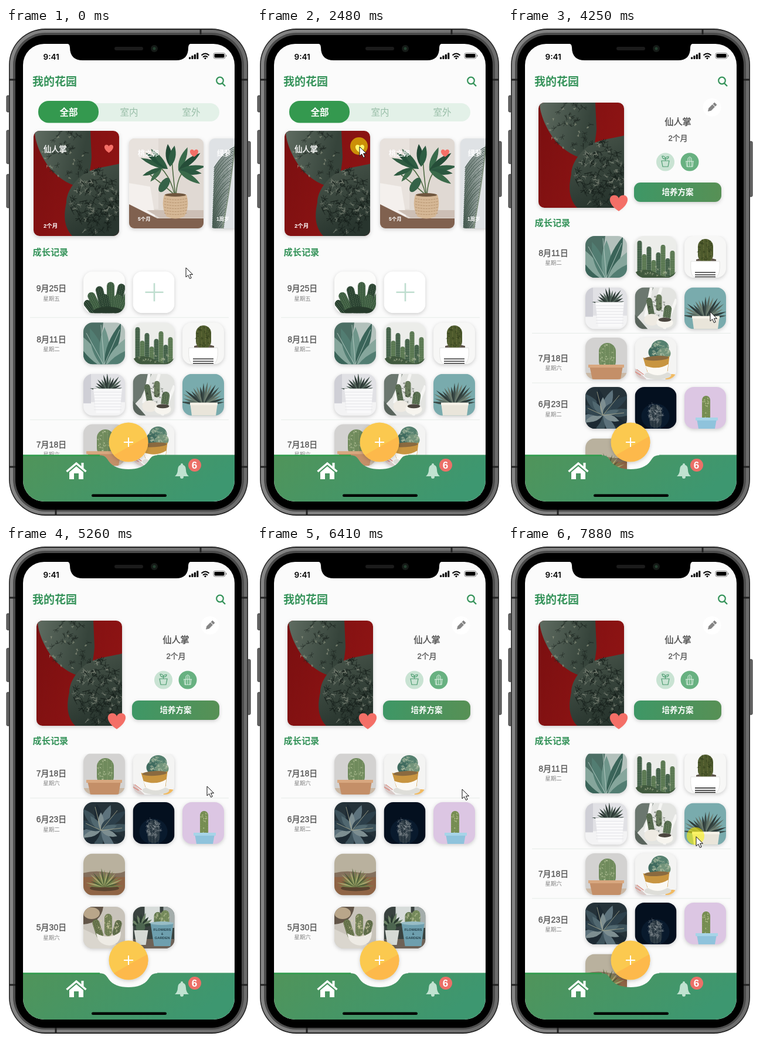
An HTML page for the animation above (8000 ms loop, 418 px wide and 834 px high).

```html
<!DOCTYPE html>
<html lang="zh-CN">
<head>
<meta charset="utf-8">
<title>我的花园</title>
<style>
html, body { margin: 0; width: 100%; height: 100%; overflow: hidden; background: #fff; }
svg { display: block; width: 100%; height: 100%; }
text { font-family: "Liberation Sans", "Noto Sans CJK SC", "Noto Sans CJK", sans-serif; }
.lift { filter: drop-shadow(0 2px 3px rgba(0, 0, 0, .18)); }
</style>
</head>
<body>
<svg id="stage" viewBox="0 0 418 834"></svg>
<script>
// --- drawing helpers, all returning SVG markup ---
let seed = 7;
const random = () => (seed = seed * 16807 % 2147483647) / 2147483647;
const repeat = (n, fn) => Array.from({ length: n }, (_, i) => fn(i)).join('');
const rect = (x, y, w, h, r, fill, more = '') =>
  `<rect x="${x}" y="${y}" width="${w}" height="${h}" rx="${r}" fill="${fill}" ${more}/>`;
const disc = (x, y, r, fill, more = '') => `<circle cx="${x}" cy="${y}" r="${r}" fill="${fill}" ${more}/>`;
const oval = (x, y, rx, ry, fill, turn = 0) =>
  `<ellipse rx="${rx}" ry="${ry}" fill="${fill}" transform="translate(${x} ${y}) rotate(${turn})"/>`;
const shape = (d, fill, more = '') => `<path d="${d}" fill="${fill}" ${more}/>`;
const line = (d, color, width = 1, more = '') => shape(d, 'none', `stroke="${color}" stroke-width="${width}" ${more}`);
// Weight 500 is a regular face thickened by a hairline stroke
const label = (text, x, midY, size, fill, weight = 500, anchor = 'middle') =>
  `<text x="${x}" y="${midY + size * .37}" font-size="${size}" fill="${fill}" text-anchor="${anchor}" ` +
  (weight === 500 ? `stroke="${fill}" stroke-width=".35"` : `font-weight="${weight}"`) + `>${text}</text>`;
const gradient = (id, from, to, vector = 'x2="1" y2="0"') =>
  `<linearGradient id="${id}" ${vector}><stop stop-color="${from}"/><stop offset="1" stop-color="${to}"/></linearGradient>`;
const clip = (id, body) => `<clipPath id="${id}">${body}</clipPath>`;
const HEART = 'M0 .43C-.64 .02-.53-.42-.25-.42C-.1-.42 0-.32 0-.23C0-.32 .1-.42 .25-.42C.53-.42 .64 .02 0 .43Z';

// Pointed leaves fanned around a base; angles in degrees, 0 = up
const blades = (x, y, n, length, from, to, width, colors) => repeat(n, i => {
  const a = (from + (to - from) * i / (n - 1)) * Math.PI / 180;
  const l = length * (.75 + .25 * random()), dx = Math.sin(a), dy = -Math.cos(a);
  const side = s => `${x + dx * l * .45 + dy * width * s} ${y + dy * l * .45 - dx * width * s}`;
  return shape(`M${x} ${y}Q${side(1)} ${x + dx * l} ${y + dy * l}Q${side(-1)} ${x} ${y}Z`, colors[i % colors.length]);
});
const cactus = (x, y, w, h, fill, rib = '#b9c69a', tilt = 0) =>
  `<g transform="rotate(${tilt} ${x + w / 2} ${y + h})">` + rect(x, y, w, h, w / 2, fill) +
  repeat(4, i => line(`M${x + w * (i + .5) / 4} ${y + (i % 3 ? 2 : w / 4)}V${y + h}`, rib, .7, 'stroke-dasharray="1 1.8"')) + '</g>';
const spines = (n, x, y, rx, ry, length, color, width = .35) => {
  const d = repeat(n, () => {
    const a = random() * 6.28, r = Math.sqrt(random());
    const px = x + Math.cos(a) * r * rx, py = y + Math.sin(a) * r * ry;
    return repeat(5, () => {
      const b = random() * 6.28;
      return `M${px.toFixed(1)} ${py.toFixed(1)}l${(Math.cos(b) * length).toFixed(1)} ${(Math.sin(b) * length).toFixed(1)}`;
    });
  });
  return line(d, color, width);
};

// --- 71 x 71 diary pictures ---
const bg = color => rect(0, 0, 71, 71, 0, color);
const pictures = {
  clump: () => bg('#fcfcfb') + [[14, 44, -38], [22, 32, -26], [31, 24, -14], [40, 18, 0], [49, 20, 12], [56, 30, 24], [36, 38, -12], [48, 38, 10]]
    .map(([x, y, tilt], i) => cactus(x, y, 13, 72 - y, i % 2 ? '#3b5b3f' : '#27402f', '#a3b794', tilt)).join('') +
    oval(42, 68, 25, 8, '#263a2b'),
  agave: () => bg('#b3c1bc') + shape('M0 0H34L24 71H0Z', '#4c6f65') +
    blades(36, 78, 7, 88, -60, 60, 17, ['#3a6459', '#86a69c', '#527d72', '#6f968b']) +
    line('M36 71L30 4M36 71L62 12M34 71L5 18', '#c3d6ce', .8),
  columns: () => bg('#ecedea') + repeat(8, i =>
    cactus(4 + i * 8, 8 + (i * 23) % 36, 8, 66, i % 2 ? '#50704a' : '#375640', '#bcc9a2')) +
    shape('M0 62Q20 52 38 64T71 60V71H0Z', '#40593e') + spines(14, 36, 60, 30, 8, 2.5, '#c8ceae'),
  add: () => bg('#fff') + line('M36.5 20V51M21 35.5H52', '#bfdecf', 2.6),
  bowl: () => bg('#f7f7f6') + shape('M20 43H54V40Q37 34 20 40Z', '#5b5248') + cactus(23, 5, 26, 40, '#4d5a2c', '#b6a867') +
    spines(30, 36, 24, 13, 18, 2.5, '#2f3a1c') + shape('M11 43H60Q62 71 50 71H20Q9 71 11 43Z', '#fff', 'stroke="#e2e2e0"') +
    [62, 66, 69.5].map(y => line(`M18 ${y}H53`, '#333', 1.6)).join(''),
  ribbed: () => bg('#e1e1e5') + rect(0, 48, 71, 23, 0, '#f3f3f4') + rect(0, 0, 13, 50, 0, '#cfcfd6') +
    blades(42, 30, 13, 32, -80, 75, 3.5, ['#35443e', '#52645a', '#2b3733']) +
    shape('M17 25H66L62 67H22Z', '#f9f9fa') + repeat(7, i => line(`M18 ${31 + i * 5}H65`, '#e4e4e8', 1)),
  trio: () => bg('#e3e4e1') + shape('M0 0H32L14 40L0 55Z', '#6b776f') + shape('M0 71V46L22 71Z', '#59645c') + line('M28 0L18 50M45 0L36 30M71 20L50 71', '#f6f6f4', 5) +
    cactus(24, 17, 10, 32, '#4a5f46', '#c7cca8', -10) + cactus(36, 12, 10, 28, '#5f7255') + cactus(47, 30, 13, 26, '#4f6749', '#d1d5b5', 8) +
    spines(20, 38, 34, 15, 18, 2.5, '#353f32') + oval(29, 55, 13, 10, '#eeeae2') + oval(51, 60, 14, 9, '#f7f5ef') + oval(51, 55, 11, 3.5, '#4b463f'),
  aloe: () => bg('#79abad') + blades(36, 53, 17, 42, -82, 82, 4, ['#3a4a47', '#596a60', '#6d7d70', '#2f3c3a']) +
    shape('M13 49H60L57 71H16Z', '#e9e5da') + shape('M13 49H60V53H13Z', '#f7f3e9'),
  barrel: () => bg('#d3d2d1') + rect(0, 60, 71, 11, 0, '#cab9a6') + cactus(23, 9, 29, 46, '#6f8a5c', '#bfca9c') +
    spines(20, 37, 30, 14, 19, 2, '#cfd6b0') + shape('M7 48H64L60 71H12Z', '#c48f68') + shape('M5 46H66V51H5Z', '#d8a77f'),
  golden: () => bg('#f4f4f3') + shape('M0 52L20 71H0Z', '#d8cac8') + oval(64, 70, 12, 8, '#f1ba62') + oval(39, 64, 23, 7, '#deded9') +
    oval(43, 17, 15, 13, '#55806f') + oval(34, 25, 11, 11, '#3f6b5f') + oval(50, 27, 11, 10, '#71937a') +
    spines(36, 43, 22, 16, 14, 3, '#c5cfb2') + shape('M14 34Q38 42 59 31L56 57Q40 69 21 58Z', '#c89540') +
    shape('M18 48Q40 56 57 45L55 59Q39 69 22 59Z', '#fbf9f4') + oval(37, 35, 21, 4, '#8a6a40', -3) + line('M0 58l10 6M3 54l12 9', '#d98f86', 1.5),
  midnight: () => bg('#253239') + blades(30, 46, 11, 58, -170, 150, 14, ['#3d525b', '#1d2a33', '#5d727c', '#2c3f4a']) +
    blades(30, 48, 7, 34, -110, 110, 10, ['#7d8e91', '#324650', '#516870']) + line('M30 48L20 8M30 48L58 14M30 48L4 36M30 48L66 44', '#b0af92', .8),
  glow: () => bg('#04101f') + oval(35, 50, 24, 22, '#091a2d') + cactus(25, 30, 21, 40, '#27353f', '#7d888c') +
    spines(40, 35, 43, 13, 17, 3.5, '#a2abae', .3),
  lilac: () => bg('#dcc6e3') + cactus(30, 15, 14, 44, '#71894e', '#c4cc95') + spines(12, 37, 34, 7, 18, 1.6, '#d9dcb2') +
    shape('M21 54H55L52 71H24Z', '#8fc3dc') + shape('M19 52H57V57H19Z', '#a7d4e8'),
  desert: () => bg('#b9b19e') + shape('M0 33Q20 28 40 32T71 30V44H0Z', '#84705d') + rect(0, 40, 71, 31, 0, '#8f6445') +
    oval(36, 59, 25, 5, '#5b442f') + blades(36, 57, 19, 34, -86, 86, 2.5, ['#75824c', '#a2a96e', '#4d6039']),
  table: () => bg('#c8c3ba') + shape('M0 0H34Q30 28 0 30Z', '#625548') + oval(14, 11, 14, 10, '#b9a68a') + shape('M0 38L71 71H0Z', '#dad6ce') +
    cactus(24, 20, 12, 34, '#5d6b45', '#d3cf9f', -18) + cactus(36, 12, 13, 38, '#6b7a4f', '#dfdcb4') + cactus(48, 22, 12, 28, '#556442', '#d3cf9f', 15) +
    spines(24, 42, 33, 17, 18, 2.5, '#e4dcb4') + shape('M22 45Q44 58 64 42Q64 65 44 66Q24 64 22 45Z', '#eeebe4'),
  bucket: () => bg('#39423f') + rect(20, 0, 26, 31, 0, '#d7dcda') + rect(52, 0, 19, 36, 0, '#a4adab') + rect(0, 55, 71, 16, 0, '#6e6257') +
    blades(14, 34, 9, 26, -75, 75, 5, ['#2b3c31', '#6c8266']) + disc(13, 35, 8, '#4d6650') + shape('M2 40H26L22 65H6Z', '#d6dad5') +
    cactus(36, 9, 13, 24, '#5c7349') + cactus(48, 6, 14, 28, '#708657') + spines(18, 50, 20, 14, 10, 2.5, '#d4d7ae') +
    shape('M30 28H69L64 67H36Z', '#6e9fae') + oval(49.5, 28, 20, 3, '#98bdc6') +
    label('FLOWERS', 50, 39, 6, '#26414b', 700) + label('&amp;', 50, 46, 5, '#26414b', 700) + label('GARDEN', 50, 53, 6, '#26414b', 700)
};

// --- feature photos ---
const pricklyPear = () => rect(0, 0, 146, 179, 0, 'url(#crimson)') +
  shape('M2 0C2 20 14 46 28 64C44 82 64 94 80 95C92 92 97 70 99 45L97 0Z', 'url(#upperPad)') +
  shape('M56 122C56 104 70 84 88 72C106 62 132 60 146 56V179H66C50 162 52 140 56 122Z', 'url(#pad)') +
  spines(30, 56, 40, 36, 42, 5, '#1d2621', .6) + spines(16, 50, 46, 36, 40, 2.5, '#9fa28c', .5) +
  spines(70, 106, 122, 42, 56, 7, '#151d19', .7) + spines(40, 106, 122, 44, 56, 4.5, '#92988a', .5);
const pottedLeaf = () => rect(0, 0, 127, 153, 0, '#e0d9d3') + rect(0, 0, 50, 120, 0, '#e8e2dd') +
  shape('M0 76L36 82L45 136L0 112Z', '#f4f0ed') + shape('M0 112L48 136H127V153H0Z', '#80614f') + shape('M30 122H127V135H52Z', '#cdbfb5') +
  line('M78 97Q70 60 45 42M79 97Q74 55 72 22M80 97Q82 60 102 46M79 97Q60 80 36 62', '#516b45', 1.6) +
  blades(66, 52, 3, 52, -68, -40, 9, ['#2f5c42', '#24503a']) + blades(56, 50, 2, 36, -140, -112, 8, ['#406e4d', '#2d5b40']) +
  blades(70, 48, 2, 46, -6, 12, 11, ['#234936', '#2e5d43']) + blades(84, 54, 3, 48, 22, 82, 10, ['#396a4b', '#254d38', '#2f5e43']) +
  blades(84, 54, 2, 46, 98, 122, 10, ['#2b5740', '#3a6a4a']) + oval(60, 79, 7, 14, '#356248', 35) +
  shape('M60 96Q80 91 98 96Q104 116 94 133Q79 140 64 133Q54 116 60 96Z', '#d5b795') +
  repeat(6, i => line(`M60 ${102 + i * 5}Q79 ${107 + i * 5} 99 ${102 + i * 5}`, '#b4916c', 1, 'stroke-dasharray="3 1.5"')) +
  oval(79, 96, 18, 3, '#6f563e');
const palm = () => rect(0, 0, 127, 153, 0, '#dfe2e5') +
  repeat(44, i => line(`M${44 - i * .45} ${14 + i * 3.2}Q${26 - i * .45} ${22 + i * 3.4} ${8 - i * .1} ${50 + i * 3.4}`, i % 2 ? '#54685d' : '#33493f', 1.3)) +
  line('M45 0Q37 80 22 153', '#80917f', 2);
const card = (x, y, w, h, body) =>
  `<g class="lift"><g transform="translate(${x} ${y})"><g clip-path="url(#card${w})">${body}</g></g></g>`;
const coral = (x, y, size) => shape(HEART, '#f46f67', `transform="translate(${x} ${y}) scale(${size})"`);

// --- diary list, laid out as on the detail page ---
const rows = [
  ['9月25日', '星期五', 267, 29, 'clump add'],
  ['8月11日', '星期二', 354, 28.5, 'agave columns bowl ribbed trio aloe'],
  ['7月18日', '星期六', 527, 34.5, 'barrel golden'],
  ['6月23日', '星期二', 611, 29, 'midnight glow lilac desert'],
  ['5月30日', '星期六', 789, 35, 'table bucket']
];
const tile = (name, x, y) => `<g class="lift"><g transform="translate(${x} ${y})"><g clip-path="url(#tile)">${pictures[name]()}</g></g></g>`;
const diary = () => rows.map(([date, day, y, dy, names]) =>
  label(date, 77.5, y + dy, 14, '#555') + label(day, 77.5, y + dy + 17, 9.5, '#858585', 400) +
  names.split(' ').map((name, i) => tile(name, 132 + i % 3 * 84.5, y + Math.floor(i / 3) * 87.5)).join('')).join('') +
  [345.5, 519.5, 604].map(y => line(`M41 ${y}H380`, '#e6ebe8', 1)).join('');

const phone = () =>
  [[1, 115, 28], [1, 174, 57], [1, 249, 57], [412, 193, 94]].map(([x, y, h]) => rect(x, y, 5, h, 2, '#666', 'stroke="#333"')).join('') +
  rect(5, 1, 408, 829, 62, '#222') + rect(6.5, 3, 405, 825, 60, 'url(#steel)') + rect(12, 8, 394, 815, 55, '#4c4c4c') +
  rect(16, 12, 386, 808, 51, '#000') + line('M6 88H16M402 88H412M6 747H16M402 747H412M332 3V11M85 820V828', '#222', 3);

const homeParts = () => rect(55, 128, 309, 31, 15.5, '#e3f1e8') + rect(55, 124, 103, 37.5, 18, '#34994f') +
  label('全部', 107, 143, 15.5, '#fff', 700) + label('室内', 210, 143.5, 15.5, '#9abfa9', 400) + label('室外', 316, 143.5, 15.5, '#9abfa9', 400) +
  card(210, 188, 127, 153, pottedLeaf()) + card(347, 188, 127, 153, palm()) +
  label('桃之卵', 225, 214, 12, '#fff', 500, 'start') + label('5个月', 225, 325, 8.5, '#fff', 700, 'start') + coral(321, 213, 15) +
  label('绿萝', 360, 214, 12, '#fff', 500, 'start') + label('1周岁', 359, 325, 8.5, '#fff', 700, 'start');

const detailParts = () => disc(348, 135, 15.5, '#fff') +
  `<g transform="translate(348 135) rotate(45)">${rect(-3, -9, 6, 4, 1, '#858585') + shape('M-3-4H3V5L0 10L-3 5Z', '#858585')}</g>` +
  label('仙人掌', 290, 159, 15.2, '#484848') + label('2个月', 290, 187.5, 13, '#555') +
  disc(268.5, 228, 15.5, '#c9e3d3') + disc(310, 228, 15.5, '#68b181') +
  line('M262 226H275L273 236H264ZM268.5 226V223Q263 223 263 218Q268.5 218 268.5 223Q268.5 219 274 219Q274 223 268.5 223', '#4d9c70', 1.2) +
  line('M303 227H317M304 227L305 236H315L316 227M306.5 227V236M310 221V236M313.5 227V236M307 227V222Q310 217 313 222V227', '#dff1e5', 1) +
  rect(215, 263, 149, 33, 11, 'url(#button)', 'class="lift"') + label('培养方案', 289.5, 279.5, 13.5, '#fff', 700);

const tabBar = () => {
  const edge = 'M29 727H158C169 727 171 731 175 737C182 747 194 751 209 751C224 751 236 747 243 737C247 731 249 727 260 727H390';
  return shape(edge + 'V806H29Z', 'url(#bar)') + line('M29 727.5H160', '#2f9c4c', 2.5) + line('M258 727H390', '#3c9863', 1.2) +
    disc(209, 705, 33.5, '#fbc94f', 'class="lift"') + shape('M241 695A33.5 33.5 0 0 1 184 727Z', '#fdb94b') + line('M209 697V713M201 705H217', '#fff', 2) +
    line('M103.5 755L120 741L136.5 755', '#fff', 3.5) + shape('M108 756L120 746L132 756V768H124V758H116V768H108Z', '#fff') + rect(128.5, 740, 4, 9, 0, '#fff') +
    shape('M288 763Q293 759 293 752Q293 744 300 743Q307 744 307 752Q307 759 312 763Z', '#c0e2d0') + disc(300, 764, 3, '#c0e2d0') + disc(300, 743, 2, '#c0e2d0') +
    disc(322, 744, 11, '#ec7068') + label('6', 321.5, 743.5, 17, '#fff', 700) + rect(146, 793.5, 128, 4.5, 2.2, '#000');
};

const statusBar = () => shape('M103 26Q109 27 109 33C109 48 117 55 131 55H290C304 55 311 48 311 33Q311 27 317 26Z', '#000') +
  rect(185, 32, 49, 6, 3, '#1b1b1b') + disc(253, 35, 6, '#151a17') + disc(253, 35, 2.5, '#24402f') +
  `<text x="63.5" y="54" font-size="13.5" font-weight="600" style="font-family:Inter,sans-serif">9:41</text>` +
  repeat(4, i => rect(312 + i * 4.4, 49.5 - i * 2.4, 3.1, 3.5 + i * 2.4, .7, '#000')) +
  line('M333.5 46.5Q340 40.5 346.5 46.5M336 49.6Q340 45.8 344 49.6', '#000', 2) + disc(340, 51.6, 1.6, '#000') +
  rect(354, 42.5, 20, 9.5, 2.6, 'none', 'stroke="#888"') + rect(355.5, 44, 17, 6.5, 1.4, '#000') + rect(375, 45.5, 1.5, 3.5, .7, '#888');

const stage = document.getElementById('stage');
stage.innerHTML = '<defs>' +
  gradient('steel', '#858585', '#6c6c6c') + gradient('bar', '#50945a', '#3d9770', 'x2="1" y2=".3"') + gradient('button', '#3e9766', '#579055') +
  gradient('crimson', '#7a0f10', '#8f1414', 'x2="1" y2=".5"') + gradient('upperPad', '#5f6c61', '#36443b', 'x2=".9" y2=".2"') +
  gradient('pad', '#4c594e', '#28352e', 'x2=".4" y2="1"') +
  clip('tile', rect(0, 0, 71, 71, 16)) + clip('card146', rect(0, 0, 146, 179, 10)) + clip('card127', rect(0, 0, 127, 153, 9)) +
  clip('screen', rect(29, 27, 361, 779, 36)) + clip('listArea', rect(29, 353, 361, 460, 0, '#000', 'id="listWindow"')) + '</defs>' +
  phone() + '<g clip-path="url(#screen)">' + rect(29, 27, 361, 779, 0, '#fbfbfb') +
  label('我的花园', 45, 90.5, 19, '#35935a', 700, 'start') + disc(365, 89.5, 5.8, 'none', 'stroke="#35935a" stroke-width="2.2"') + line('M369 94L374 99', '#35935a', 2.4) +
  `<g clip-path="url(#listArea)"><g id="list">${diary()}</g></g>` +
  `<g id="section">${label('成长记录', 45.5, 0, 15.2, '#35935a', 700, 'start')}</g>` +
  `<g id="home">${homeParts()}</g><g id="detail">${detailParts()}</g>` +
  `<g id="feature">${card(0, 0, 146, 179, pricklyPear())}<g id="caption">` +
  label('仙人掌', 17, 31, 13.3, '#fff', 500, 'start') + label('2个月', 17, 161, 9.5, '#fff', 700, 'start') + '</g></g>' +
  shape(HEART, '#f46f67', 'id="heart"') + tabBar() + '</g>' + statusBar() +
  disc(-1, -1, 15, '#fff200', 'id="halo"') +
  shape('M0 0V16L3.7 12.6L6.5 18.6L9.2 17.4L6.5 11.6H11.5Z', '#fff', 'id="cursor" stroke="#111"');

// --- motion ---
const LOOP = 8000, LIST_END = 175;
const clamp = v => Math.min(1, Math.max(0, v));
const mix = (a, b, p) => a + (b - a) * p;
const ramp = (t, start, end) => clamp((t - start) / (end - start));
const easeOut = (t, start, end) => 1 - (1 - ramp(t, start, end)) ** 3;
const easeInOut = u => u * u * (3 - 2 * u);

// time, x, y
const cursorPath = [
  [50, 307, 408], [840, 175, 204], [1740, 175, 204], [1930, 185, 214], [2120, 185, 214], [2310, 175, 202],
  [2580, 175, 202], [3020, 284, 463], [3270, 284, 463], [3480, 335, 618], [3860, 335, 618], [4200, 345, 483],
  [4270, 345, 483], [4480, 343, 409], [5520, 343, 409], [5760, 357, 555], [5820, 357, 555],
  [6180, 350, 414], [6600, 350, 414], [6790, 356, 455], [7000, 356, 455], [7170, 349, 521],
  [7300, 349, 521], [7780, 321, 497], [7840, 321, 497], [8000, 321, 483]
];
const presses = [[900, 1300], [2460, 2640], [3850, 4220], [4270, 4520], [5800, 6200], [7010, 7160], [7850, 8200]];

function cursorAt(t) {
  const i = cursorPath.findIndex(key => key[0] >= t);
  if (i < 1) return cursorPath[0].slice(1);
  const [t0, x0, y0] = cursorPath[i - 1], [t1, x1, y1] = cursorPath[i];
  const p = easeInOut((t - t0) / (t1 - t0));
  return [mix(x0, x1, p), mix(y0, y1, p)];
}

// Fling to the end, pull past it and spring back, fling to the top, start a new drag
function scrollAt(t) {
  const fling = easeOut(t, 4270, 4800) - easeOut(t, 7020, 7890);
  const pull = 105 * (easeInOut(ramp(t, 5820, 6180)) - easeOut(t, 6180, 6420));
  return LIST_END * fling + pull + 16 * ramp(t, 7840, 8000);
}

const parts = Object.fromEntries([...stage.querySelectorAll('[id]')].map(node => [node.id, node]));
const move = (id, x, y, scale = 1) => parts[id].setAttribute('transform', `translate(${x} ${y}) scale(${scale})`);
const fade = (id, opacity) => parts[id].setAttribute('opacity', opacity);

function render(t) {
  const open = easeInOut(ramp(t, 3860, 4200));
  move('feature', mix(47, 52, open), mix(175, 127, open));
  move('heart', mix(175.5, 189, open), mix(205.5, 298, open), mix(16, 32, open));
  parts.heart.setAttribute('fill', t > 1000 && t < 2550 ? '#fff' : '#f46f67');
  move('section', 0, mix(381, 331, open));
  move('list', 0, mix(147.3, 0, open) - scrollAt(t));
  parts.listWindow.setAttribute('y', mix(400, 353.5, open));
  move('home', 60 * open, 0);
  fade('home', 1 - open);
  fade('caption', 1 - open);
  fade('detail', open);

  const [x, y] = cursorAt(t);
  move('cursor', x, y);
  move('halo', x, y);
  const press = presses.find(([start, end]) => t >= start && t < end);
  fade('halo', press ? .56 * clamp((press[1] - t) / 120) : 0);
}

const tick = now => { render(now % LOOP); requestAnimationFrame(tick); };
render(0);
requestAnimationFrame(tick);
</script>
</body>
</html>
```
